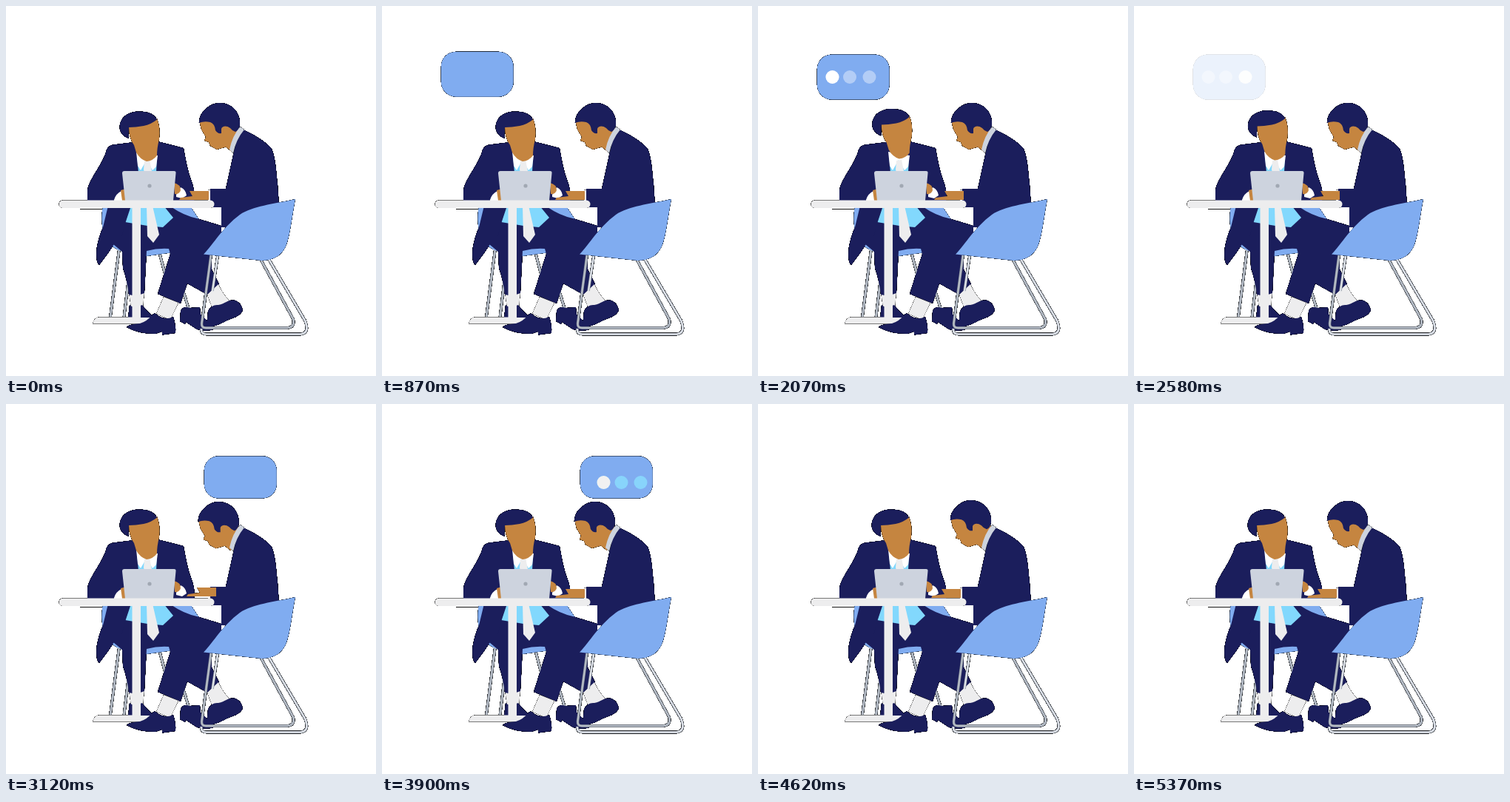
Animation of 500 by 500 pixels, one loop 5430 ms. Source, as an HTML page:

```html
<!DOCTYPE html>
<html lang="en">
<head>
<meta charset="utf-8">
<title>Two colleagues talking</title>
<style>
  html, body { margin: 0; height: 100%; overflow: hidden; background: #fff; }
  svg { display: block; width: 100vw; height: 100vh; }
  .navy { fill: #1b1e5c; }
  .skin { fill: #c58540; }
  .blue { fill: #80acf0; }
  .cyan { fill: #82d8fd; }
  .pale { fill: #ededee; }
  .white { fill: #fff; }
  .grey { fill: #cdd3de; }
  .tube { fill: none; stroke: #7d848e; stroke-width: 3.6; stroke-linejoin: round; }
  .shine { fill: none; stroke: #b4bbc5; stroke-width: 2.4; stroke-linejoin: round; }
  .light { stroke: #dce0e7; }
</style>
</head>
<body>
<svg viewBox="0 0 500 500">
  <defs>
    <!-- dark hairline along antialiased outer edges -->
    <filter id="edge" filterUnits="userSpaceOnUse" x="0" y="0" width="500" height="500" color-interpolation-filters="sRGB">
      <feComponentTransfer in="SourceAlpha" result="rim">
        <feFuncA type="linear" slope="8" intercept="-.8"/>
      </feComponentTransfer>
      <feMerge><feMergeNode in="rim"/><feMergeNode in="SourceGraphic"/></feMerge>
    </filter>
    <path id="backLegs" d="M153 328L141 420M166 366L159.500 420M208 336L217 370M238 380L247 410"/>
    <path id="farFrame" d="M286 338L279 385M355 342L404 425Q411 442 398 443.500H272Q263 444 264 436"/>
    <path id="nearFrame" d="M277 337L264.500 429Q264 435 270 435H380Q391 434 388 423L345 344"/>
  </defs>

  <g filter="url(#edge)">
    <!-- back chair -->
    <use href="#backLegs" class="tube"/><use href="#backLegs" class="shine"/>
    <path class="blue" d="M131 270C128 285 129 305 136 315Q143 328 158 332L190 338 226 333 222 322 262 290 250 272Z"/>

    <!-- seated man on the left: legs -->
    <path class="pale" d="M166 386H187L185 408H169Z"/>
    <path class="navy" d="M167 404Q172 409 184 404Q190 412 197 418V421H165Z"/>
    <path class="navy" d="M160 272H224Q240 283 258 287L291 297V330L277 336 278 356 288 376 272 390 245 375 236 402 205 389 222 335 220 328Q205 327 190 331L189 350 187 388Q176 393 166 390Q164 372 158 354L157 332 145 322Z"/>
    <path class="cyan" d="M168 270H213L226 286 212 299 191 297 161 292Z"/>
    <path class="navy" d="M138 270H169L160 297 157 310 146 322 138 334 126 350Q121 346 122.500 328Q125 312 131 299Z"/>
    <path class="pale" d="M190 270H198L207 309 199 320 191 311Z"/>

    <!-- torso -->
    <path class="navy" d="M173 184L149 187Q139 187 136 194C131 214 113 232 110 249L110 267H253Q257 257 252 240C246 225 243 209 240 192L205 183Z"/>
    <path class="cyan" d="M177 200L179 226H203L204 203Z"/>
    <path class="white" d="M176 197L178 216 182 222 190 208 198 222 203 217 205 202Z"/>
    <path class="pale" d="M187 209L194 208 197 223 199 230H188L186 221Z"/>
    <g id="leftHead">
      <path class="skin" d="M166 163L204 152Q209 164 207 180Q204 192 204 202Q199 209 190 210Q181 207 176 198L173 188Q166 179 166 163Z"/>
      <path class="navy" d="M165.500 179Q152 173 153.800 161C156 148 168 142.600 180 142.600Q199 142.600 204 153.500Q196 160 186 162Q175 164 166 164Z"/>
    </g>

    <!-- seated man on the right -->
    <path class="navy" d="M316 165C335 173 352 184 359 193C364.500 205 365 224 367 240L369 270 340 300 291 299V272H276V247H297L308 197Z"/>
    <path class="white" d="M273 248.500H276V263H273Z"/>
    <g id="rightHead">
      <path class="skin" d="M261.500 156L264 167 270 177 268 182 274 184 276 189 285 194 297 190.500 305 197 316 166 306 156 280 150Z"/>
      <path class="navy" d="M260.800 158Q261 146 270 139C278 131 287 130 295 131.500C310 135 317 148 316 161Q315 168 310 170Q305 168 303 165C298 161 292 162 291 166V172Q286 173 283 168Q282 159 276 157Q268 155 260.800 158Z"/>
    </g>
    <path class="grey" d="M316.500 163L322 167Q311 180 307 199L302 194Q306 175 316.500 163Z"/>

    <!-- hands and laptop -->
    <path class="white" d="M146 262Q148 254 156 250L162 263H146ZM230 255L236 245Q243 248 244 256L238 260 230 258Z"/>
    <path class="skin" d="M155 249L162 247V263H157ZM227 239Q236 241 236 249Q234 255 228 254Z"/>
    <path class="skin" id="hand" d="M274 250H256L248 250 252 257 236 259 234 262H274Z"/>
    <path class="grey" d="M160 223H227Q230 223 229.500 226L226 263H161L157 226Q157 223 160 223Z"/>
    <circle cx="194" cy="243" r="2.600" fill="#a1a8b3"/>

    <!-- table -->
    <path class="pale" d="M170.500 272H182V421H205V429.500H117Q119 420.500 126 420.500H170.500Z"/>
    <rect class="pale" x="71.500" y="262.500" width="210" height="10.500" rx="5.250"/>
    <path d="M100 274.500H130" stroke="#222" stroke-width=".6"/>

    <!-- front feet -->
    <path class="pale" d="M213 393L233 401 222 424 203 416ZM272 390L287 376Q294 391 302 398L280 412Z"/>
    <path class="navy" d="M163 434Q166 430 181 429Q191 426 198 417Q201 413 206 419Q215 425 226 420Q230 432 229 442L211 444.500V440L202 443Q178 443 163 434Z"/>
    <path class="navy" d="M236 412Q239 405 248 408L262 407 263 417 283 436Q273 441 258 437L243 427 242 430 235 426Z"/>
    <path class="navy" d="M273 412Q278 403 287 404C298 402 300 396 310 398Q318 401 320 411Q318 418 306 422C294 426 284 435 271 433Z"/>

    <!-- front chair -->
    <use href="#farFrame" class="tube"/><use href="#farFrame" class="shine light"/>
    <use href="#nearFrame" class="tube"/><use href="#nearFrame" class="shine"/>
    <path class="blue" d="M391 261C386 286 384 311 378 325Q369 344 345 344L267 335.500C281 321 292 300 316 282C334 270 360 268 391 261Z"/>
  </g>

  <g id="leftBubble">
    <rect class="blue" filter="url(#edge)" x="79.800" y="65.500" width="97.800" height="61" rx="20"/>
  </g>
  <g id="rightBubble">
    <rect class="blue" filter="url(#edge)" x="267.800" y="70.500" width="98" height="57" rx="19"/>
  </g>
</svg>
<script>
const LOOP = 5430, BEAT = 870;
const $ = id => document.getElementById(id);

// Eased value at time t from a flat list: time, value, time, value, ...
function at(t, keys) {
  if (t <= keys[0]) return keys[1];
  for (let i = 2; i < keys.length; i += 2) {
    if (t > keys[i]) continue;
    const u = (t - keys[i - 2]) / (keys[i] - keys[i - 2]);
    return keys[i - 1] + (keys[i + 1] - keys[i - 1]) * u * u * (3 - 2 * u);
  }
  return keys[keys.length - 1];
}

function addDots(bubble, xs, y, base, baseAlpha, glow) {
  const circle = (x, fill) => {
    const c = document.createElementNS('http://www.w3.org/2000/svg', 'circle');
    for (const [k, v] of Object.entries({ cx: x, cy: y, r: 9, fill })) c.setAttribute(k, v);
    return bubble.appendChild(c);
  };
  return xs.map(x => ({ base: circle(x, base), glow: circle(x, glow), baseAlpha }));
}

function pulse(dots, t, peak, show) {
  dots.forEach((d, i) => {
    const wave = Math.cos(2 * Math.PI * ((t - peak) / BEAT - i / 3));
    d.base.setAttribute('opacity', show * d.baseAlpha);
    d.glow.setAttribute('opacity', show * Math.max(0, wave));
  });
}

const move = (id, x, y) => $(id).setAttribute('transform', `translate(${x} ${y})`);
const fade = (id, alpha) => $(id).setAttribute('opacity', alpha);

const leftDots = addDots($('leftBubble'), [100.5, 124, 150.5], 96, '#fff', .4, '#fff');
const rightDots = addDots($('rightBubble'), [299.5, 323.5, 349.5], 106, '#88d4fb', 1, '#f1f1f1');

function draw(now) {
  const t = now % LOOP;
  fade('leftBubble', at(t, [600, 0, 780, 1, 2400, 1, 2640, 0]));
  move('leftBubble', 0, at(t, [690, -6, 1140, 0]));
  pulse(leftDots, t, 2070, at(t, [1140, 0, 1350, 1]));

  fade('rightBubble', at(t, [2880, 0, 3060, 1, 4200, 1, 4440, 0]));
  pulse(rightDots, t, 3900, at(t, [3240, 0, 3450, 1]));

  move('leftHead', at(t, [1200, 0, 1700, .7, 2300, .7, 2800, 0]),
                   at(t, [1200, 0, 1700, -3.5, 2300, -3.5, 2800, 0]));
  move('rightHead', at(t, [2700, 0, 3100, -1.3, 4620, -1, 5300, 0]),
                    at(t, [2700, 0, 3100, 1.2, 3900, 1, 4620, -.8, 5300, 0]));
  move('hand', at(t, [1200, 0, 2070, 4, 2700, 4, 3120, 10, 3800, 0]),
               at(t, [2700, 0, 3120, -2, 3800, 0]));
}

const start = performance.now();
function step() {
  draw(performance.now() - start);
  requestAnimationFrame(step);
}
step();
</script>
</body>
</html>
```
